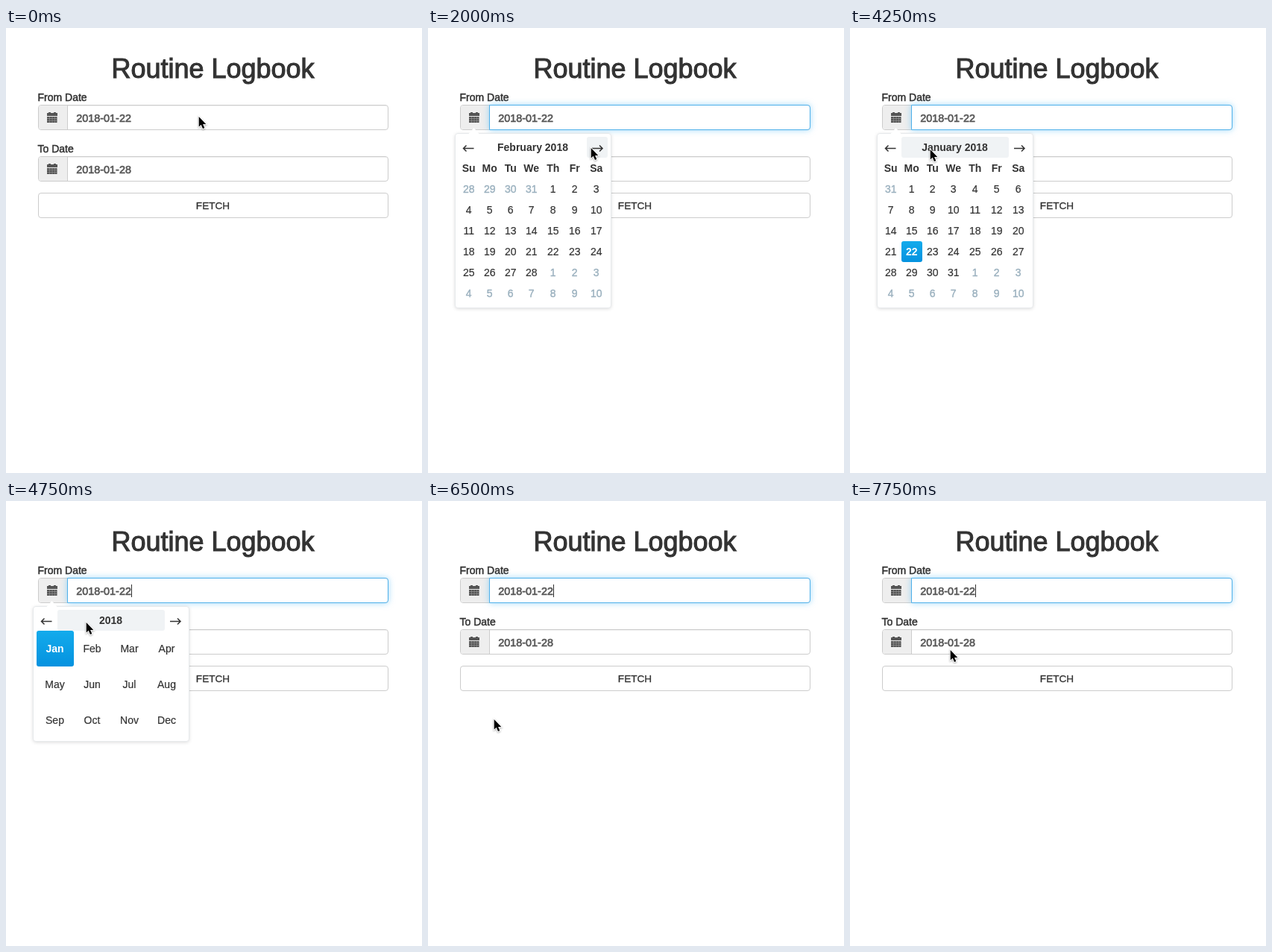
Animation, 558 px wide and 597 px high, one loop 8000 ms. Source, as an HTML page:

```html
<!DOCTYPE html>
<html lang="en">
<head>
<meta charset="utf-8">
<title>Date picker</title>
<style>
  html, body { margin: 0; width: 100%; height: 100%; overflow: hidden; background: #fff; }
  svg { display: block; }
  text {
    font: 14px "Liberation Sans", Arial, sans-serif; text-anchor: middle;
    fill: #333; stroke: #333; stroke-width: .2px;
  }
  .title { font-size: 36px; stroke-width: 1.1px; }
  .label { text-anchor: start; stroke-width: .5px; }
  .date { font-size: 14.4px; text-anchor: start; fill: #555; stroke: #555; stroke-width: .6px; }
  .button { font-size: 13.6px; stroke-width: .3px; }
  .bold { font-weight: bold; stroke: none; }
  .muted { fill: #9ab0be; stroke: #9ab0be; stroke-width: .4px; }
  .on { fill: #fff; font-weight: bold; stroke: none; }
  .glow { filter: drop-shadow(0 0 4px #66c3f5a0); }
  .popup { filter: drop-shadow(0 1px 2px #0002); }
  .cursor { filter: drop-shadow(0 1px 1px #0005); }
</style>
</head>
<body>
<svg id="stage" width="558" height="597" viewBox="0 0 558 597"></svg>
<script>
const STEP = 250, LOOP = 8000;
const stage = document.getElementById('stage');

// Pointer stops: step, x, y
const stops = [
  [0, 258, 119], [1, 250, 122], [2, 232, 128], [4, 229, 140], [5, 224, 152], [6, 218, 161],
  [10, 190, 166], [11, 130, 168], [12, 75, 164], [13, 57, 162],
  [16, 80, 162], [17, 107, 163], [20, 92, 182], [21, 76, 200], [22, 72, 203],
  [24, 80, 250], [25, 88, 293], [30, 110, 240], [31, 134, 200]
];
// Popup views: first step, name
const views = [[0, ''], [1, 'January'], [8, 'February'], [14, 'January'], [18, 'year'], [22, 'January'], [26, '']];

const latest = (list, step) => list.filter(e => e[0] <= step).pop();
const text = (x, y, s, cls = '') => `<text x="${x}" y="${y}" class="${cls}">${s}</text>`;
const rect = (x, y, w, h, fill, more = '') =>
  `<rect x="${x}" y="${y}" width="${w}" height="${h}" fill="${fill}" ${more}/>`;
const path = (d, more) => `<path d="${d}" ${more}/>`;
const frame = (x, y, w, h, fill, stroke) =>
  rect(x + .5, y + .5, w - 1, h - 1, fill, `rx="3.5" stroke="${stroke}"`);
const chosen = (x, y, w, h) => rect(x, y, w, h, 'url(#blue)', 'rx="3"');

const defs = `<defs><linearGradient id="blue" x2="0" y2="1">
  <stop stop-color="#13abec"/><stop offset="1" stop-color="#0592df"/></linearGradient></defs>`;

function icon(y) {
  return path(`M57 ${y}h3v1h4v-1h3v1h2v4h-14v-4h2z`, 'fill="#555"') +
    rect(55, y + 6, 13.5, 8, '#555') +
    path(`M55 ${y + 8.5}h13.5M55 ${y + 11.5}h13.5M58.5 ${y + 6}v8M62 ${y + 6}v8M65.5 ${y + 6}v8`,
      'stroke="#999" stroke-width=".6"');
}

function field(y, label, value, focus, caret) {
  return text(42.5, y - 5, label, 'label') +
    frame(43, y, 470, 34, '#fff', '#ccc') +
    path(`M82 ${y + 1}H47a3 3 0 0 0-3 3v26a3 3 0 0 0 3 3H82z`, 'fill="#eee"') +
    path(`M82.5 ${y}v34`, 'stroke="#ccc"') + icon(y + 10) +
    (focus
      ? path(`M82.5 ${y + .5}H509a3.5 3.5 0 0 1 3.5 3.5v26a3.5 3.5 0 0 1-3.5 3.5H82.5z`,
          'fill="#fff" stroke="#4fb0ea" class="glow"')
      : path(`M83 ${y + 1.5}H510`, 'stroke="#000" stroke-opacity=".06"')) +
    text(94.3, y + 23, value, 'date') +
    (caret ? path(`M168.5 ${y + 9}v17`, 'stroke="#333"') : '');
}

function arrow(x, dir) {
  return path(`M${x - 7} 161.5h14M${x + dir * 3} 157.5l${dir * 4} 4l${-dir * 4} 4`,
    'fill="none" stroke="#333" stroke-width="1.5"');
}

const colLeft = i => 41 + 28 * i + Math.max(0, i - 3);
const colMid = i => colLeft(i) + 13.7;

function days(month) {
  const jan = month === 'January';
  const first = new Date(2018, jan ? 0 : 1, 1);
  let out = '';
  'Su Mo Tu We Th Fr Sa'.split(' ').forEach((d, i) => out += text(colMid(i), 193, d, 'bold'));
  for (let n = 0; n < 42; n++) {
    const date = new Date(2018, first.getMonth(), 1 - first.getDay() + n);
    const col = n % 7, top = 202 + 28 * Math.floor(n / 7), day = date.getDate();
    const inside = date.getMonth() === first.getMonth();
    const on = jan && inside && day === 22;
    if (on) out += chosen(colLeft(col), top, 28, 28);
    out += text(colMid(col), top + 19, day, on ? 'on' : inside ? '' : 'muted');
  }
  return out;
}

function months() {
  return chosen(41, 174, 50, 48) +
    'Jan Feb Mar Apr May Jun Jul Aug Sep Oct Nov Dec'.split(' ').map((m, i) =>
      text(65.5 + 50 * (i % 4), 203 + 48 * Math.floor(i / 4), m, i ? '' : 'on')).join('');
}

function popup(view, x, y) {
  const year = view === 'year';
  let hover = '';
  if (y >= 146 && y < 174) {
    const [left, w] = x < 69 ? [41, 28] : x < 213 ? [69, 144] : [213, 28];
    hover = rect(left, 146, w, 28, '#f0f3f5', 'rx="3"');
  }
  return `<g class="popup">${frame(36, 141, 210, year ? 182 : 235, '#fff', '#e6e9eb')}</g>` +
    path('M54.5 142l7-8l7 8z', 'fill="#fff"') +
    hover + arrow(54.5, -1) + arrow(227, 1) +
    text(140.5, 165, year ? '2018' : view + ' 2018', 'bold') +
    (year ? months() : days(view));
}

function draw(step) {
  const [, x, y] = latest(stops, step);
  const view = latest(views, step)[1];
  const focus = step > 0, caret = step % 4 > 1;
  const over = !view && y >= 221 && y < 255;
  stage.innerHTML = defs +
    text(277.5, 67, 'Routine Logbook', 'title') +
    field(103, 'From Date', '2018-01-22', focus, caret) +
    field(172, 'To Date', '2018-01-28') +
    frame(43, 221, 470, 34, over ? '#e6e6e6' : '#fff', over ? '#adadad' : '#ccc') +
    text(277.5, 243, 'FETCH', 'button') +
    (view ? popup(view, x, y) : '') +
    path('M0 0V13.5L3 10.7L5.3 16L7.6 15L5.4 9.9H9.6z',
      `transform="translate(${x + .7} ${y})" stroke="#fff" stroke-width="1.8" paint-order="stroke" class="cursor"`);
}

let shown = -1;
function tick() {
  const step = Math.floor(performance.now() % LOOP / STEP);
  if (step !== shown) draw(shown = step);
  requestAnimationFrame(tick);
}
tick();
</script>
</body>
</html>
```
